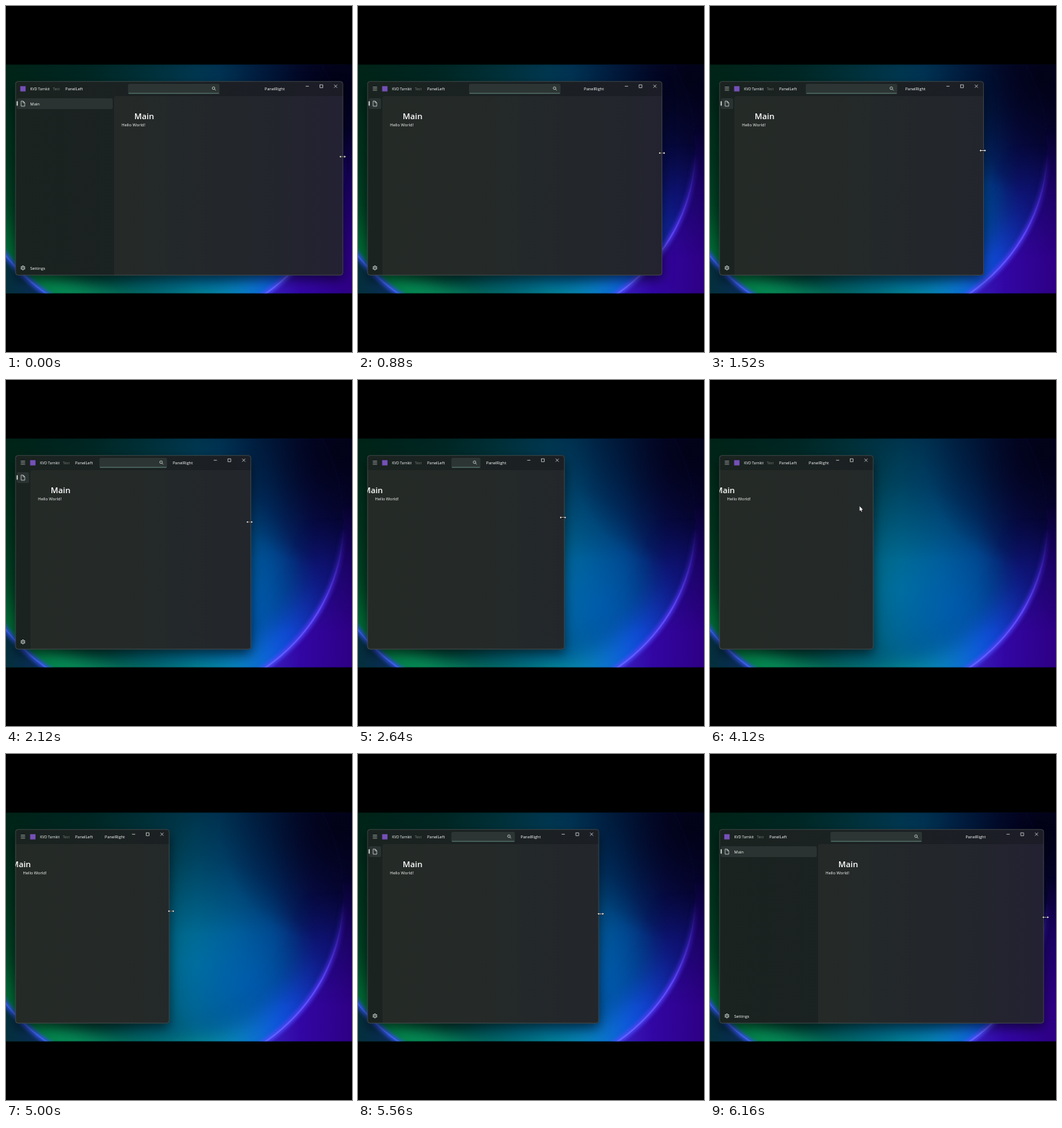
An HTML page with a canvas for the animation above (6200 ms loop, 480 px wide and 480 px high).

```html
<!DOCTYPE html>
<html lang="en">
<head>
<meta charset="utf-8">
<title>Resizing window</title>
<style>
  html, body { margin: 0; width: 100%; height: 100%; overflow: hidden; background: #000; }
  canvas { display: block; width: 480px; height: 480px; }
</style>
</head>
<body>
<canvas id="stage" width="480" height="480"></canvas>
<script>
const LOOP = 6200, LEFT = 13, TOP = 104.5, BOTTOM = 373.5, BAR = 125;
const WIDE_FROM = 443, COMPACT_FROM = 286.5;
const FONT = '"Open Sans", "Noto Sans", sans-serif';
const INK = '#dfe4e2';
const ctx = document.getElementById('stage').getContext('2d');

// time, right window edge, cursor x, cursor y
const KEYS = [
  [0, 467.5, 467, 209],
  [880, 422, 421.7, 204],
  [2120, 340, 338, 197],
  [3200, 229, 226.7, 184],
  [3280, 226.5, 225.5, 184],
  [3560, 226.5, 223, 183],
  [4120, 226.5, 207.5, 175],
  [4440, 226.5, 210, 190],
  [4920, 226.5, 229, 218],
  [5060, 226.5, 229, 218],
  [6160, 463, 465.5, 226.5],
  [6200, 467, 467.5, 226.5]
];

function poseAt(t) {
  const i = KEYS.findIndex(k => k[0] > t);
  const a = KEYS[i - 1], b = KEYS[i];
  const p = (t - a[0]) / (b[0] - a[0]);
  return a.map((v, n) => v + (b[n] - v) * p);
}

function withStops(gradient, stops) {
  stops.forEach(([at, color]) => gradient.addColorStop(at, color));
  return gradient;
}
const across = (x0, x1, stops) => withStops(ctx.createLinearGradient(x0, 0, x1, 0), stops);
const down = (y0, y1, stops) => withStops(ctx.createLinearGradient(0, y0, 0, y1), stops);

function newLayer() {
  const c = document.createElement('canvas');
  c.width = c.height = 480;
  return c.getContext('2d');
}

function fill(g, style) {
  g.fillStyle = style;
  g.fillRect(0, 0, 480, 480);
}

function blob(g, x, y, r, rgb, alpha) {
  fill(g, withStops(ctx.createRadialGradient(x, y, 0, x, y, r), [
    [0, `rgba(${rgb},${alpha})`], [0.5, `rgba(${rgb},${alpha * 0.5})`], [1, `rgba(${rgb},0)`]
  ]));
}

// keeps only the lower part of a layer, with a soft upper end
function fadeTop(g, y0, y1) {
  g.globalCompositeOperation = 'destination-in';
  fill(g, down(y0, y1, [[0, 'rgba(0,0,0,0)'], [1, '#000']]));
}

function orb(g) {
  g.beginPath();
  g.ellipse(208, 197, 260, 249, 0, 0, 7);
}

function orbStroke(g, width, blur, style) {
  g.filter = blur ? `blur(${blur}px)` : 'none';
  g.lineWidth = width;
  g.strokeStyle = style;
  orb(g);
  g.stroke();
  g.filter = 'none';
}

function paintWallpaper() {
  const g = newLayer();
  g.beginPath();
  g.rect(0, 81.5, 480, 317);
  g.clip();
  fill(g, across(0, 480, [
    [0, '#003a20'], [0.06, '#003a24'], [0.25, '#003f36'], [0.42, '#00505c'], [0.55, '#005a80'],
    [0.66, '#004e86'], [0.77, '#003a80'], [0.89, '#0a1062'], [1, '#0a0446']
  ]));
  blob(g, 265, 290, 150, '0,125,170', 0.6);
  blob(g, 340, 320, 110, '0,95,200', 0.5);
  fill(g, down(81, 250, [[0, 'rgba(0,6,12,.45)'], [1, 'rgba(0,6,12,0)']]));
  blob(g, 460, 100, 165, '1,1,20', 0.9);

  const glow = newLayer();
  orb(glow);
  glow.clip();
  orbStroke(glow, 70, 16, across(0, 480, [
    [0, 'rgba(0,150,70,.55)'], [0.3, 'rgba(16,200,130,.8)'], [0.55, 'rgba(10,195,155,.8)'],
    [0.68, 'rgba(12,145,210,.8)'], [0.8, 'rgba(20,85,250,.8)'], [0.92, 'rgba(30,40,200,.55)'], [1, 'rgba(30,20,170,.4)']
  ]));
  fadeTop(glow, 190, 350);
  g.drawImage(glow.canvas, 0, 0);

  const outside = newLayer();
  fill(outside, across(0, 480, [
    [0, '#04303c'], [0.12, '#0c2a60'], [0.72, '#3a28c8'], [0.85, '#3206a4'], [1, '#2e0084']
  ]));
  outside.globalCompositeOperation = 'destination-out';
  orb(outside);
  outside.fill();
  fadeTop(outside, 170, 350);
  g.drawImage(outside.canvas, 0, 0);

  const rim = newLayer();
  orbStroke(rim, 7, 2.5, across(0, 480, [[0, '#2a50d8'], [0.75, '#4a50ff'], [1, '#4a20d8']]));
  orbStroke(rim, 2, 0.7, across(0, 480, [[0, '#3a60e0'], [0.75, '#6068ff'], [1, '#6038f0']]));
  fadeTop(rim, 205, 320);
  g.drawImage(rim.canvas, 0, 0);
  return g.canvas;
}

function box(x, y, w, h, r, style) {
  ctx.beginPath();
  ctx.roundRect(x, y, w, h, r);
  ctx.fillStyle = style;
  ctx.fill();
}

function text(str, x, y, size = 5.7, color = '#f8faf9', weight = 500) {
  ctx.font = `${weight} ${size}px ${FONT}`;
  ctx.fillStyle = color;
  ctx.fillText(str, x, y);
}

// each line is a flat list x, y, x, y...
function lines(list, color = INK, width = 0.7) {
  ctx.beginPath();
  for (const [x, y, ...rest] of list) {
    ctx.moveTo(x, y);
    for (let i = 0; i < rest.length; i += 2) ctx.lineTo(rest[i], rest[i + 1]);
  }
  ctx.strokeStyle = color;
  ctx.lineWidth = width;
  ctx.stroke();
}

function ring(x, y, r, width = 0.7) {
  ctx.beginPath();
  ctx.arc(x, y, r, 0, 7);
  ctx.strokeStyle = INK;
  ctx.lineWidth = width;
  ctx.stroke();
}

function gear(x, y) {
  ring(x, y, 2.4, 0.8);
  ring(x, y, 0.9, 0.6);
  for (let i = 0; i < 6; i++) {
    const a = (i + 0.5) * Math.PI / 3, c = Math.cos(a), s = Math.sin(a);
    lines([[x + c * 2.4, y + s * 2.4, x + c * 3.3, y + s * 3.3]], INK, 1.1);
  }
}

function drawTitleBar(right, wide) {
  const dx = wide ? 0 : 13.7;
  if (!wide) lines([112.5, 114.7, 116.9].map(y => [20.5, y, 26.5, y]), '#b9bfbd');
  box(19.8 + dx, 111.2, 7.4, 7.4, 0, '#7650b8');
  text('KVD Tarnkit', 33.5 + dx, 117, 5.05);
  text('Test', 65 + dx, 117, 5.05, '#757c7a');
  text('PanelLeft', 82.3 + dx, 117, 5.6);
  text('PanelRight', Math.max(137, right - 108.7), 117, 5.65);

  const w = Math.min(127, right - 246);
  if (w > 6) {
    const x = (LEFT + right - w) / 2 - (wide ? 7.5 : 0);
    box(x, 108, w, 13.5, 2, '#2c3533');
    box(x + 0.5, 120.8, w - 1, 0.8, 0.4, '#6f9a8e');
    if (w > 14) {
      ring(x + w - 8.3, 114, 1.8);
      lines([[x + w - 7, 115.3, x + w - 5.2, 117.1]]);
    }
  }

  const b = right - 30;
  lines([
    [b - 21.7, 111.3, b - 17.3, 111.3],
    [b - 2, 109.3, b + 2, 109.3, b + 2, 113.3, b - 2, 113.3, b - 2, 109],
    [b + 17.8, 109.2, b + 22, 113.4],
    [b + 22, 109.2, b + 17.8, 113.4]
  ]);
}

function drawPane(wide) {
  box(15, 128, wide ? 133 : 17, 15, 2, '#2a3331');
  box(14.8, 132, 1.4, 6.5, 0.7, '#e4f2ee');
  lines([
    [21, 132, 24, 132, 26, 134, 26, 139, 21, 139, 21, 131.7],
    [23.9, 132, 23.9, 134.2, 26, 134.2]
  ]);
  gear(23.5, 363.3);
  if (wide) {
    text('Main', 33.5, 137.7);
    text('Settings', 33.5, 365.7);
  }
}

function drawWindow(right) {
  const wide = right >= WIDE_FROM, minimal = right < COMPACT_FROM;
  const content = wide ? 150 : minimal ? LEFT : 34;
  const w = right - LEFT, h = BOTTOM - TOP;

  ctx.save();
  ctx.shadowColor = 'rgba(0,0,0,.6)';
  ctx.shadowBlur = 16;
  ctx.shadowOffsetY = 6;
  box(LEFT, TOP, w, h, 3.5, '#1b2321');
  ctx.restore();

  ctx.save();
  ctx.beginPath();
  ctx.roundRect(LEFT, TOP, w, h, 3.5);
  ctx.clip();
  ctx.fillStyle = across(LEFT, 470, [[0, '#1a2320'], [0.4, '#1b2122'], [1, '#1c1c27']]);
  ctx.fillRect(LEFT, TOP, w, h);
  box(content, BAR, right - content, h, minimal ? 0 : [3, 0, 0, 0],
    across(LEFT, 470, [[0, '#242a26'], [0.34, '#252a28'], [0.48, '#23282a'], [0.75, '#23262c'], [1, '#232133']]));

  drawTitleBar(right, wide);
  if (!minimal) drawPane(wide);
  text('Main', minimal ? 7.2 : content + 28, 157.3, 11.3, '#fff', 600);
  text('Hello World!', minimal ? 23.5 : content + 10.2, 166.7, 5.75);
  ctx.restore();

  ctx.beginPath();
  ctx.roundRect(LEFT + 0.2, TOP + 0.2, w - 0.4, h - 0.4, 3.5);
  ctx.strokeStyle = 'rgba(120,130,130,.45)';
  ctx.lineWidth = 0.8;
  ctx.stroke();
}

function polygon(pts) {
  ctx.beginPath();
  for (let i = 0; i < pts.length; i += 2) ctx.lineTo(pts[i], pts[i + 1]);
  ctx.closePath();
  ctx.strokeStyle = '#000';
  ctx.lineWidth = 0.8;
  ctx.stroke();
  ctx.fillStyle = '#fff';
  ctx.fill();
}

function drawCursor(x, y, right) {
  ctx.save();
  ctx.translate(x, y);
  if (x > right - 5) {
    polygon([-4.4, 0, -2.4, -1.5, -2.4, -0.3, 2.4, -0.3, 2.4, -1.5, 4.4, 0,
      2.4, 1.5, 2.4, 0.3, -2.4, 0.3, -2.4, 1.5]);
  } else {
    polygon([0, 0, 0, 6.8, 1.5, 5.4, 2.6, 7.8, 3.6, 7.3, 2.6, 5, 4.6, 4.9]);
  }
  ctx.restore();
}

const wallpaper = paintWallpaper();

function frame(now) {
  const [, right, x, y] = poseAt(now % LOOP);
  fill(ctx, '#000');
  ctx.drawImage(wallpaper, 0, 0);
  drawWindow(right);
  drawCursor(x, y, right);
  requestAnimationFrame(frame);
}
requestAnimationFrame(frame);
</script>
</body>
</html>
```
